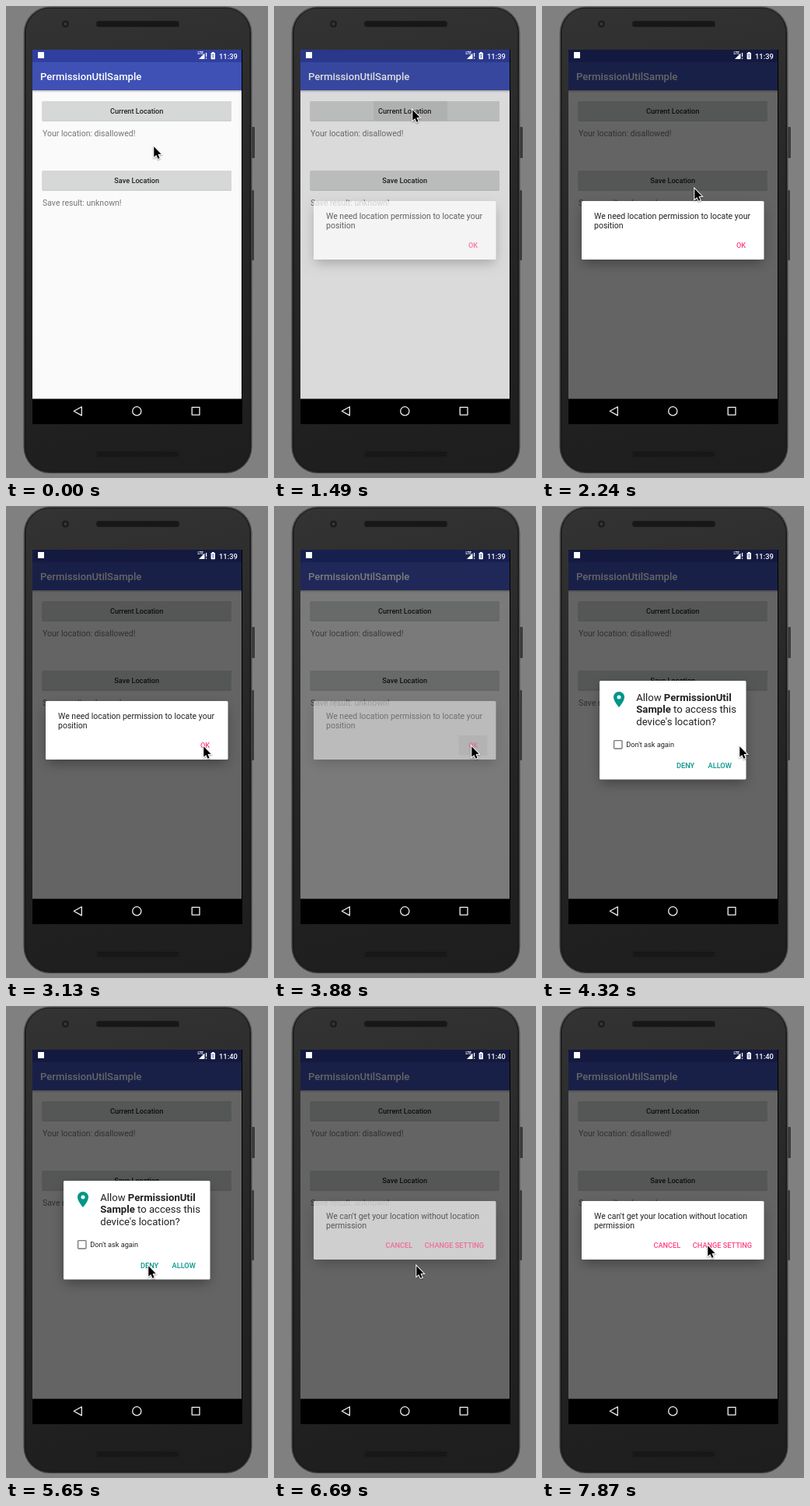
These frames come from a looping animation (337x605 px, 8 s). An HTML page with a canvas:

```html
<!DOCTYPE html>
<html lang="en">
<head>
<meta charset="utf-8">
<title>Permission dialogs</title>
<style>
html, body { margin: 0; width: 100%; height: 100%; overflow: hidden; background: #808080; }
canvas { display: block; width: 337px; height: 605px; }
</style>
</head>
<body>
<canvas id="stage" width="337" height="605"></canvas>
<script>
const ctx = document.getElementById('stage').getContext('2d');
const LOOP = 8000;
const INK = '#212121', PINK = '#ff4081', TEAL = '#009688';
const DIM = 0.6;

function roundRect(x, y, w, h, r, fill) {
  ctx.beginPath();
  ctx.roundRect(x, y, w, h, r);
  ctx.fillStyle = fill;
  ctx.fill();
}

function rect(x, y, w, h, fill) {
  ctx.fillStyle = fill;
  ctx.fillRect(x, y, w, h);
}

function text(s, x, y, size, color, weight = 400, align = 'left') {
  ctx.font = `${weight} ${size}px Roboto, sans-serif`;
  ctx.textAlign = align;
  ctx.fillStyle = color;
  ctx.fillText(s, x, y);
}

function poly(points) {
  ctx.beginPath();
  points.forEach(([x, y]) => ctx.lineTo(x, y));
  ctx.closePath();
}

function gradient(x0, y0, x1, y1, stops) {
  const g = ctx.createLinearGradient(x0, y0, x1, y1);
  stops.forEach((c, i) => g.addColorStop(i / (stops.length - 1), c));
  return g;
}

function withAlpha(alpha, draw) {
  ctx.save();
  ctx.globalAlpha = alpha;
  draw();
  ctx.restore();
}

// ---- phone ----

function speaker(y) {
  roundRect(116, y, 107, 8, 3.5, '#1b1b1b');
  for (let row = 0; row < 3; row++)
    for (let x = 118 + row % 2; x < 221; x += 2)
      rect(x, y + 1.5 + row * 2, 1, 1, '#0d0d0d');
}

function phone() {
  rect(0, 0, 337, 605, '#808080');
  roundRect(316, 155, 4, 40, 1, '#3b3b3b');
  roundRect(316, 236, 3, 90, 1, '#3b3b3b');
  roundRect(22.5, 0.5, 294, 598.5, 34, gradient(0, 0, 0, 600, ['#555555', '#3f3f3f', '#3a3a3a']));
  roundRect(24, 2, 291, 595.5, 32.5, '#181818');
  roundRect(25.5, 3, 288, 593, 31, gradient(60, 0, 200, 600, ['#333333', '#2a2a2a', '#232323', '#1e1e1e']));
  speaker(19);
  speaker(570.5);
  ctx.beginPath();
  ctx.arc(76.5, 23, 4.5, 0, 7);
  ctx.fillStyle = '#1c1c1c';
  ctx.fill();
  ctx.beginPath();
  ctx.arc(76.5, 23, 2, 0, 7);
  ctx.fillStyle = '#37393d';
  ctx.fill();
}

// ---- app ----

function button(label, y) {
  roundRect(46.5, y + 0.8, 243.5, 25, 1.3, 'rgba(0,0,0,.22)');
  roundRect(46.5, y, 243.5, 24.7, 1.3, '#d6d7d7');
  text(label, 168.2, y + 15.6, 9.19, INK, 500, 'center');
}

function app(ripple) {
  rect(34, 56, 270, 448, '#fafafa');
  rect(34, 56, 270, 16, '#303f9f');
  rect(34, 72, 270, 36, '#3f51b5');
  rect(34, 108, 270, 3, gradient(0, 108, 0, 111, ['rgba(0,0,0,.25)', 'rgba(0,0,0,0)']));
  text('PermissionUtilSample', 44, 95, 13.13, '#fff', 500);
  button('Current Location', 122);
  if (ripple) rect(175.5 - ripple, 122, ripple * 2, 24.7, 'rgba(0,0,0,.06)');
  text('Your location: disallowed!', 47, 166.5, 10.5, '#757575');
  button('Save Location', 211);
  text('Save result: unknown!', 47, 255.5, 10.5, '#757575');
}

function statusIcons(clock) {
  rect(41, 59, 8, 8, '#fff');
  text('LTE', 246.5, 62, 4.5, '#fff', 700);
  ctx.fillStyle = '#fff';
  poly([[248, 68], [255.5, 68], [255.5, 60.5]]);
  ctx.fill();
  rect(257, 60, 1.2, 5, '#fff');
  rect(257, 66.4, 1.2, 1.4, '#fff');
  rect(265, 59, 2.6, 1.4, '#fff');
  roundRect(263.6, 60, 5.4, 8.2, 0.6, '#fff');
  rect(264.8, 61.4, 3, 2.2, 'rgba(48,63,159,.5)');
  rect(265.7, 64, 1.2, 2.6, 'rgba(48,63,159,.8)');
  text(clock, 297.8, 67.6, 9.4, '#fff', 500, 'right');
}

function navBar() {
  rect(34, 503.5, 270, 32.5, '#000');
  ctx.strokeStyle = '#f2f2f2';
  ctx.lineWidth = 1.3;
  ctx.lineJoin = 'round';
  poly([[87.3, 519.3], [97.3, 513.7], [97.3, 524.9]]);
  ctx.stroke();
  ctx.beginPath();
  ctx.arc(168.3, 519.3, 5.6, 0, 7);
  ctx.stroke();
  ctx.strokeRect(239.2, 514.3, 9.8, 9.8);
}

// ---- dialogs ----

function panel(x, y, w, h) {
  ctx.save();
  ctx.beginPath();
  ctx.rect(34, 56, 270, 447);
  ctx.roundRect(x, y, w, h, 1.5);
  ctx.clip('evenodd');
  ctx.shadowColor = 'rgba(0,0,0,.36)';
  ctx.shadowBlur = 16;
  ctx.shadowOffsetY = 6;
  roundRect(x + 2, y + 2, w - 4, h - 4, 1.5, '#000');
  ctx.restore();
  roundRect(x, y, w, h, 1.5, '#fff');
}

function message(line1, line2, actions) {
  panel(51, 250, 234.5, 75);
  text(line1, 67, 272.8, 10.5, INK);
  text(line2, 67, 285.1, 10.5, INK);
  actions.forEach(([label, x]) => text(label, x, 310.2, 9.19, PINK, 500));
}

function askDialog(alpha, pressed) {
  withAlpha(alpha, () => {
    message('We need location permission to locate your', 'position', [['OK', 250]]);
    if (pressed) roundRect(237.5, 294, 37, 25.5, 1.3, 'rgba(0,0,0,.09)');
  });
}

function deniedDialog(alpha) {
  withAlpha(alpha, () => message("We can't get your location without location", 'permission',
    [['CANCEL', 143.4], ['CHANGE SETTING', 193.8]]));
}

function systemDialog(alpha, pressed) {
  withAlpha(alpha, () => {
    panel(74, 224, 188.5, 126.5);
    ctx.save();
    ctx.translate(87, 236);
    ctx.fillStyle = TEAL;
    ctx.fill(new Path2D('M12 2C8.1 2 5 5.1 5 9c0 5.3 7 13 7 13s7-7.7 7-13c0-3.9-3.1-7-7-7z'));
    ctx.beginPath();
    ctx.arc(12, 9, 2.5, 0, 7);
    ctx.fillStyle = '#fff';
    ctx.fill();
    ctx.restore();

    text('Allow ', 121.3, 249.7, 13.13, INK);
    text('PermissionUtil', 121.3 + ctx.measureText('Allow ').width, 249.7, 13.13, INK, 700);
    text('Sample', 121.3, 265.1, 13.13, INK, 700);
    text(' to access this', 121.3 + ctx.measureText('Sample').width, 265.1, 13.13, INK);
    text("device's location?", 121.3, 280.5, 13.13, INK);

    ctx.strokeStyle = '#757575';
    ctx.lineWidth = 1.3;
    ctx.beginPath();
    ctx.roundRect(92.6, 300.6, 10.4, 10.4, 1);
    ctx.stroke();
    text("Don't ask again", 108.3, 309.2, 9.19, INK);
    if (pressed) roundRect(167, 320, 36, 25, 1.3, 'rgba(0,0,0,.09)');
    text('DENY', 173, 335.6, 9.19, TEAL, 500);
    text('ALLOW', 213.6, 335.6, 9.19, TEAL, 500);
  });
}

// ---- pointer ----

// start, end, number of steps, from, to
const MOVES = [
  [450, 890, 4, [190, 180], [178, 133]],
  [2240, 2240, 1, [178, 133], [196, 234]],
  [2390, 3130, 6, [196, 234], [254, 308]],
  [4910, 5650, 6, [254, 308], [183, 333]],
  [7290, 7870, 5, [183, 333], [213, 307]]
];

function pointerAt(t) {
  let pos = MOVES[0][3];
  for (const [start, end, n, from, to] of MOVES) {
    if (t < start) break;
    const beat = n > 1 ? (end - start) / (n - 1) : 1;
    const p = Math.min(1, (Math.floor((t - start + 5) / beat) + 1) / n);
    const e = p * (2 - p);
    pos = from.map((v, i) => v + (to[i] - v) * e);
  }
  return pos;
}

function pointer([x, y]) {
  ctx.save();
  ctx.translate(x, y);
  poly([[0.3, 0.3], [0.3, 13.6], [3.3, 10.9], [5.5, 15.8], [7.6, 14.9], [5.5, 10.1], [9.6, 9.8]]);
  ctx.lineJoin = 'miter';
  ctx.lineWidth = 2;
  ctx.strokeStyle = '#fff';
  ctx.shadowColor = 'rgba(0,0,0,.4)';
  ctx.shadowBlur = 2;
  ctx.shadowOffsetY = 1;
  ctx.stroke();
  ctx.shadowColor = 'transparent';
  ctx.fillStyle = '#000';
  ctx.fill();
  ctx.restore();
}

// ---- timeline ----

const SCENES = [
  { at: 0, dim: 0 },
  { at: 1340, dim: 0, ripple: 30 },
  { at: 1490, dim: 0.13, ripple: 47.5, dialog: () => askDialog(0.7) },
  { at: 1640, dim: DIM, dialog: () => askDialog(1) },
  { at: 3880, dim: 0.51, dialog: () => askDialog(0.49, true) },
  { at: 4030, dim: 0.12 },
  { at: 4170, dim: 0.3, dialog: () => systemDialog(0.7) },
  { at: 4320, dim: DIM, dialog: () => systemDialog(1) },
  { at: 6540, dim: DIM, dialog: () => systemDialog(1, true) },
  { at: 6690, dim: DIM, dialog: () => deniedDialog(0.69) },
  { at: 6840, dim: DIM, dialog: () => deniedDialog(1) }
];

function render(t) {
  const scene = SCENES.findLast(s => s.at <= t);
  phone();
  app(scene.ripple);
  rect(34, 56, 270, 448, `rgba(0,0,0,${scene.dim})`);
  if (scene.dialog) scene.dialog();
  statusIcons(t < 5350 ? '11:39' : '11:40');
  navBar();
  rect(303, 56, 1, 480, '#000');
  pointer(pointerAt(t));
}

const begin = performance.now();
function tick() {
  render((performance.now() - begin) % LOOP);
  requestAnimationFrame(tick);
}
tick();
</script>
</body>
</html>
```
